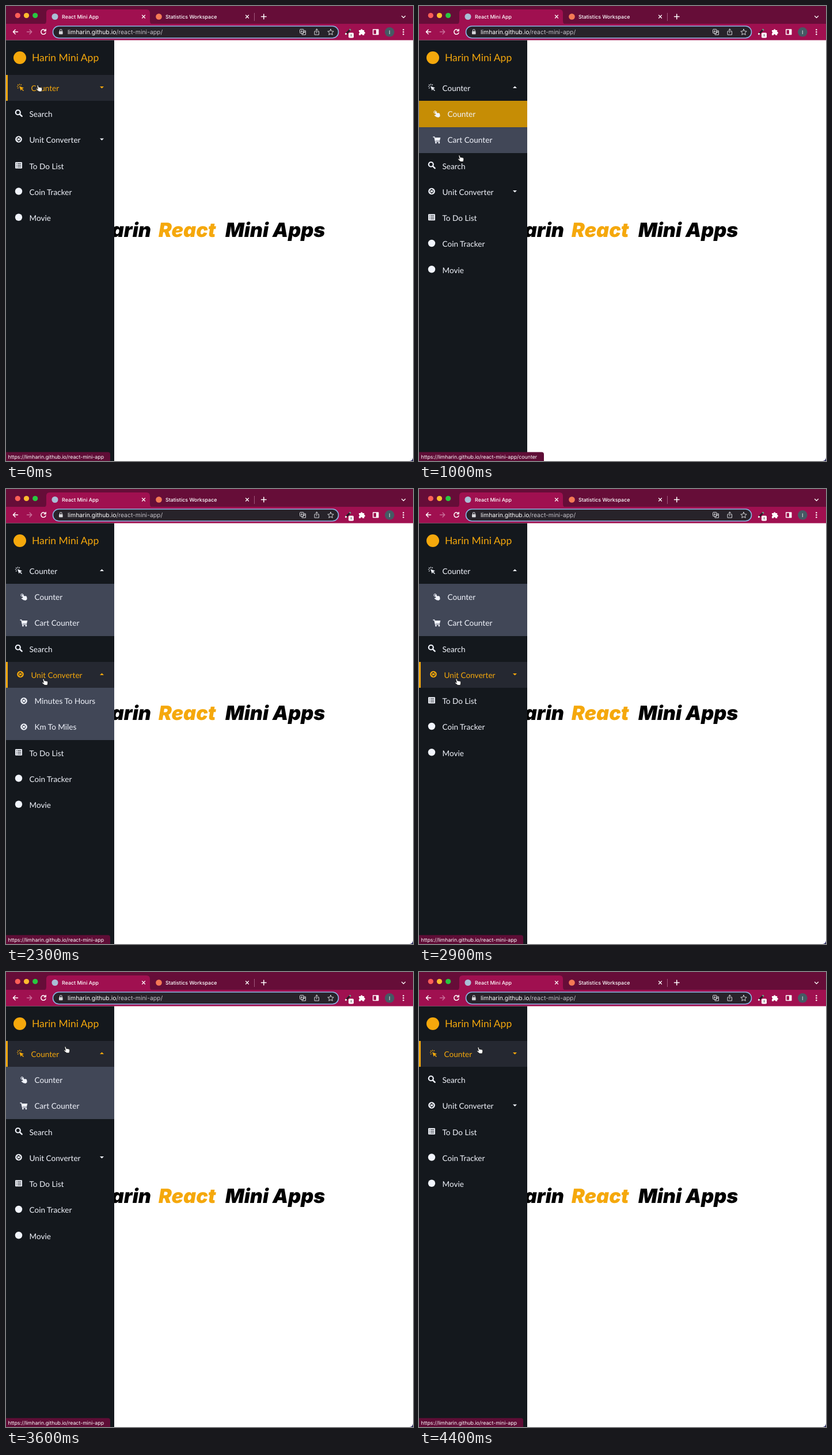
Recreate the animation shown at these times as an HTML page. Size 707 by 792 pixels, loop 4.8 s.

```html
<!DOCTYPE html>
<html lang="en">
<head>
<meta charset="utf-8">
<title>React Mini App</title>
<style>
html, body { margin: 0; width: 100%; height: 100%; overflow: hidden; background: #fff; }
svg { display: block; width: 707px; height: 792px; }
text { white-space: pre; text-rendering: geometricPrecision; }
.ui { font-family: Inter, Roboto, sans-serif; fill: #fff; }
.head { font: italic 900 34.2px Inter, "Open Sans", sans-serif; }
.line { fill: none; stroke: #fff; stroke-width: 1.5; stroke-linecap: round; stroke-linejoin: round; }
.menu text { font: 13.6px Lato, "Open Sans", sans-serif; fill: currentColor; }
.row { color: #f1f4fc; --bg: #14181d; }
.row.sub { --bg: #414757; }
.row.hover { color: #f5a80c; --bg: #252831; }
.row.sub.hover { color: #f1f4fc; --bg: #c68d05; }
.back { fill: var(--bg); shape-rendering: crispEdges; }
.edge { fill: #f5a80c; visibility: hidden; shape-rendering: crispEdges; }
.hover:not(.sub) .edge { visibility: visible; }
.icon { fill: currentColor; }
.icon .pen { fill: none; stroke: currentColor; stroke-linecap: round; }
.icon .cut { fill: none; stroke: var(--bg); }
</style>
</head>
<body>
<svg viewBox="0 0 707 792">
  <rect width="707" height="792" fill="#fff"/>

  <g class="head">
    <text x="252" y="401.5" text-anchor="end">Harin</text>
    <text x="265" y="401.5" fill="#f5a80c">React</text>
    <text x="381" y="401.5">Mini Apps</text>
  </g>

  <!-- tab strip -->
  <rect width="707" height="32" fill="#660d38"/>
  <path d="M64 32Q70 32 70 26V12Q70 6 76 6H244Q250 6 250 12V26Q250 32 256 32Z" fill="#a01050"/>
  <circle cx="20.300" cy="16.500" r="4.600" fill="#ff5f57"/>
  <circle cx="35.500" cy="16.500" r="4.600" fill="#febc2e"/>
  <circle cx="50.700" cy="16.500" r="4.600" fill="#28c840"/>
  <circle cx="85" cy="18.500" r="5.500" fill="#a9bfd6"/>
  <circle cx="265.500" cy="18.500" r="5.300" fill="#f47a55"/>
  <g class="ui" font-size="8.9" font-weight="500">
    <text x="97" y="22">React Mini App</text>
    <text x="277" y="22">Statistics Workspace</text>
  </g>
  <path class="line" style="stroke-width:1.2" d="M236.500 16l5 5m0-5l-5 5M416.500 16l5 5m0-5l-5 5M687.500 17.500l3 3 3-3"/>
  <path class="line" d="M443.500 18.500h8.500M447.750 14.250v8.500"/>
  <path d="M431.500 12v14" stroke="#a0587c"/>

  <!-- toolbar -->
  <rect y="31" width="707" height="28.500" fill="#a01050"/>
  <path class="line" d="M20.500 45H12.500m3.600-3.700L12.400 45l3.700 3.700"/>
  <path class="line" style="stroke:#c9709a" d="M36.500 45H44.700m-3.600-3.700L44.800 45l-3.700 3.700"/>
  <path class="line" d="M68.700 43A4.200 4.200 0 1 0 69 46.500M69.200 40.500V43.500H66.200"/>
  <rect x="81.500" y="35" width="496" height="20.800" rx="10.400" fill="#27232a" stroke="#8db6e6" stroke-width="1.600"/>
  <rect x="92" y="44" width="6.600" height="5.200" rx=".8" fill="#d6d6da"/>
  <path class="line" style="stroke:#d6d6da;stroke-width:1.100" d="M93.500 44v-1.500a1.800 1.800 0 0 1 3.600 0V44"/>
  <text class="ui" x="107" y="49" font-size="10.4">limharin.github.io<tspan fill="#c4c1c8">/react-mini-app/</tspan></text>
  <g class="line" style="stroke:#d6d6da;stroke-width:1">
    <rect x="510.500" y="40.500" width="6.500" height="7" rx="1"/>
    <path d="M517 43h3.500v7h-6.500v-2M516 45.500h3.500M518 44.500q0 3-2 4M512.300 44h2.800M513.700 42.500v1.500q0 1.500-1.500 2"/>
    <path d="M538 44h-2v6h7.500v-6h-2M539.750 47v-7m-2 2l2-2 2 2"/>
    <path d="M564 40.300l1.500 3.400 3.700.4-2.800 2.500.8 3.600-3.200-1.900-3.200 1.900.8-3.600-2.800-2.500 3.700-.4Z"/>
  </g>
  <path d="M590 49l7-7" stroke="#2b1a25" stroke-width="3"/>
  <path d="M589.500 49.500l2-2" stroke="#fff" stroke-width="2.500"/>
  <path d="M597 42l1.500-1.500" stroke="#5bb98c" stroke-width="3"/>
  <rect x="595" y="46.500" width="9" height="9" rx="1.800" fill="#fff"/>
  <path d="M599.500 49v4" stroke="#444"/>
  <path d="M613 42h3a1.700 1.700 0 1 1 3.400 0h2.800v3a1.700 1.700 0 1 1 0 3.400v2.300h-3a1.600 1.600 0 0 0-3.200 0h-3v-3a1.700 1.700 0 0 0 0-3.200Z" fill="#fff"/>
  <rect class="line" x="637.700" y="41" width="9" height="8.500"/>
  <rect x="643" y="41" width="4" height="8.500" fill="#fff"/>
  <circle cx="666.300" cy="45.300" r="8.300" fill="#455a64"/>
  <text class="ui" x="666.300" y="48.700" font-size="9" text-anchor="middle">I</text>
  <g fill="#fff">
    <circle cx="690.300" cy="41.300" r="1.200"/><circle cx="690.300" cy="45.300" r="1.200"/><circle cx="690.300" cy="49.300" r="1.200"/>
  </g>

  <!-- sidebar -->
  <rect y="59.500" width="188" height="733" fill="#14181d"/>
  <circle cx="24" cy="90" r="11" fill="#f5a80c"/>
  <text x="45" y="96.300" fill="#f5a80c" font-size="17.5" font-family="Lato, 'Open Sans', sans-serif">Harin Mini App</text>
  <g class="menu" id="menu"></g>

  <path id="bar" fill="#5f0d36"/>
  <text class="ui" id="link" x="3.500" y="787.500" font-size="8.800"></text>
  <path d="M707 786Q706.500 791.500 701 792H707Z" fill="#2b2a63"/>
  <path id="hand" fill="#fff" stroke="#111" stroke-width=".8" stroke-linejoin="round"
    d="M3.200 6.800L1.900 1.900Q1.900.8 2.900.7 3.700.7 4 1.600L4.900 4.500Q6 3.800 6.800 4.700 8 4.200 8.700 5.100 10.200 4.800 10.600 6.200 11.100 8.800 10 10.900L10.200 12H5L4.500 11.200Q2.800 10.200.9 8.200.4 7.100 1.400 6.800 2.400 6.800 3.400 7.700Z"/>
</svg>

<script>
const ROW = 45.25, TOP = 120, WIDTH = 188, LOOP = 4800;
const SITE = 'https://limharin.github.io/react-mini-app';

const icons = {
  click: '<path d="M-2-2L6 1 3 2.400 6 5.400 4.900 6.500 1.900 3.500.6 6Z"/><path class="pen" stroke-width="1.100" d="M-3.500-3.500l-1-1M-1.500-4.200v-1.500M-4.200-1.500h-1.500M.8-3.800l.8-1M-3.600.8l-1 .8"/>',
  tap: '<circle class="pen" cx="-3" cy="-3" r="2.200" stroke-width="1"/><path d="M-3.600-3.600Q-2.500-4.400-1.800-3.400L.2-1.400 3.500-1.500Q5.500-1 5.300 1L5.600 4.200 3 6.300-.6 5.400-4.200 3Q-4.200 1.700-2.800 1.800L-1.500 2Z"/>',
  cart: '<path class="pen" stroke-width="1.300" d="M-6.200-5H-4.200L-2.500 2.800H4.600"/><path d="M-4-3.900H6.300L5 1.500H-2.900Z"/><circle cx="-1.600" cy="5" r="1.400"/><circle cx="3.900" cy="5" r="1.400"/>',
  search: '<circle class="pen" cx="-1.200" cy="-1.500" r="4" stroke-width="2.200"/><path class="pen" stroke-width="2.500" d="M2.200 1.900L5.600 5.200"/>',
  sync: '<circle r="5.800"/><path class="cut" stroke-width="1.200" d="M-2 2A2.800 2.800 0 0 1 .8-2.700M2-2A2.800 2.800 0 0 1-.8 2.700M-.6-3.800L.9-2.700-.3-1.500M.6 3.800L-.9 2.700.3 1.500"/>',
  list: '<rect x="-6" y="-5.500" width="12" height="11" rx="1"/><path class="cut" d="M-4.300-2.800h1.400m1 0H4.400M-4.300 0h1.400m1 0H4.400M-4.300 2.800h1.400m1 0H4.400"/>',
  coin: '<circle r="6.200"/>'
};

// id, label, icon, parent, has submenu
const items = [
  ['counter', 'Counter', 'click', '', true],
  ['tap', 'Counter', 'tap', 'counter'],
  ['cart', 'Cart Counter', 'cart', 'counter'],
  ['search', 'Search', 'search'],
  ['unit', 'Unit Converter', 'sync', '', true],
  ['hours', 'Minutes To Hours', 'sync', 'unit'],
  ['miles', 'Km To Miles', 'sync', 'unit'],
  ['todo', 'To Do List', 'list'],
  ['coin', 'Coin Tracker', 'coin'],
  ['movie', 'Movie', 'coin']
].map(([id, label, icon, parent, folds]) => ({ id, label, icon, parent, folds }));

// start time, hand x, hand y, hovered row, open submenus, link path
const steps = [
  [0, 52, 137, 'counter', '', ''],
  [400, 52, 137, 'counter', 'counter', ''],
  [800, 52, 137.5, 'counter', 'counter', ''],
  [1000, 67, 259, 'tap', 'counter', '/counter'],
  [1100, 65, 288, 'search', 'counter', '/counter'],
  [1200, 63, 315, 'unit', 'counter', ''],
  [1300, 62, 327, 'unit', 'counter', ''],
  [1400, 62, 329.5, 'unit', 'counter', ''],
  [1600, 62, 329.5, 'unit', 'counter unit', ''],
  [2900, 62, 329.5, 'unit', 'counter', ''],
  [3200, 65, 312, 'unit', 'counter', ''],
  [3300, 75, 265, 'search', 'counter', ''],
  [3400, 87, 196, 'tap', 'counter', '/counter'],
  [3500, 97, 144, 'counter', 'counter', '/counter'],
  [3600, 100, 129, 'counter', 'counter', ''],
  [3800, 100, 130, 'counter', 'counter', ''],
  [4300, 100, 130, 'counter', '', '']
];

const $ = id => document.getElementById(id);

for (const item of items) {
  const g = document.createElementNS('http://www.w3.org/2000/svg', 'g');
  g.innerHTML = `<rect class="back" width="${WIDTH}" height="${ROW}"/>
    <rect class="edge" width="3" height="${ROW}"/>
    <g class="body"><g class="icon" transform="translate(${item.parent ? 31 : 22} ${item.parent ? 22.5 : 21.5})">${icons[item.icon]}</g>
    <text x="${item.parent ? 49.5 : 40.5}" y="27.800">${item.label}</text></g>
    ${item.folds ? '<path class="caret" fill="currentColor"/>' : ''}`;
  item.g = g;
  item.body = g.querySelector('.body');
  item.caret = g.querySelector('.caret');
  $('menu').append(g);
}

function show([, x, y, hover, open, path]) {
  const opened = open.split(' ');
  let n = 0;
  for (const { id, parent, g, body, caret } of items) {
    const visible = !parent || opened.includes(parent);
    const on = id === hover;
    g.setAttribute('display', visible ? 'inline' : 'none');
    if (!visible) continue;
    g.setAttribute('transform', `translate(0 ${TOP + ROW * n++})`);
    g.setAttribute('class', `row${parent ? ' sub' : ''}${on ? ' hover' : ''}`);
    body.setAttribute('transform', `translate(${on && !parent ? 3 : 0} 0)`);
    if (caret) caret.setAttribute('d', opened.includes(id) ? 'M163 23H170L166.500 19.500Z' : 'M163 20H170L166.500 23.500Z');
  }
  const w = path ? 217 : 181;
  $('bar').setAttribute('d', `M0 776.500H${w - 4}Q${w} 776.500 ${w} 780.500V792H0Z`);
  $('link').textContent = SITE + path;
  $('hand').setAttribute('transform', `translate(${x} ${y})`);
}

let last;
function tick() {
  const t = performance.now() % LOOP;
  const step = steps.filter(s => s[0] <= t).pop();
  if (step !== last) show(last = step);
  requestAnimationFrame(tick);
}
tick();
</script>
</body>
</html>
```
